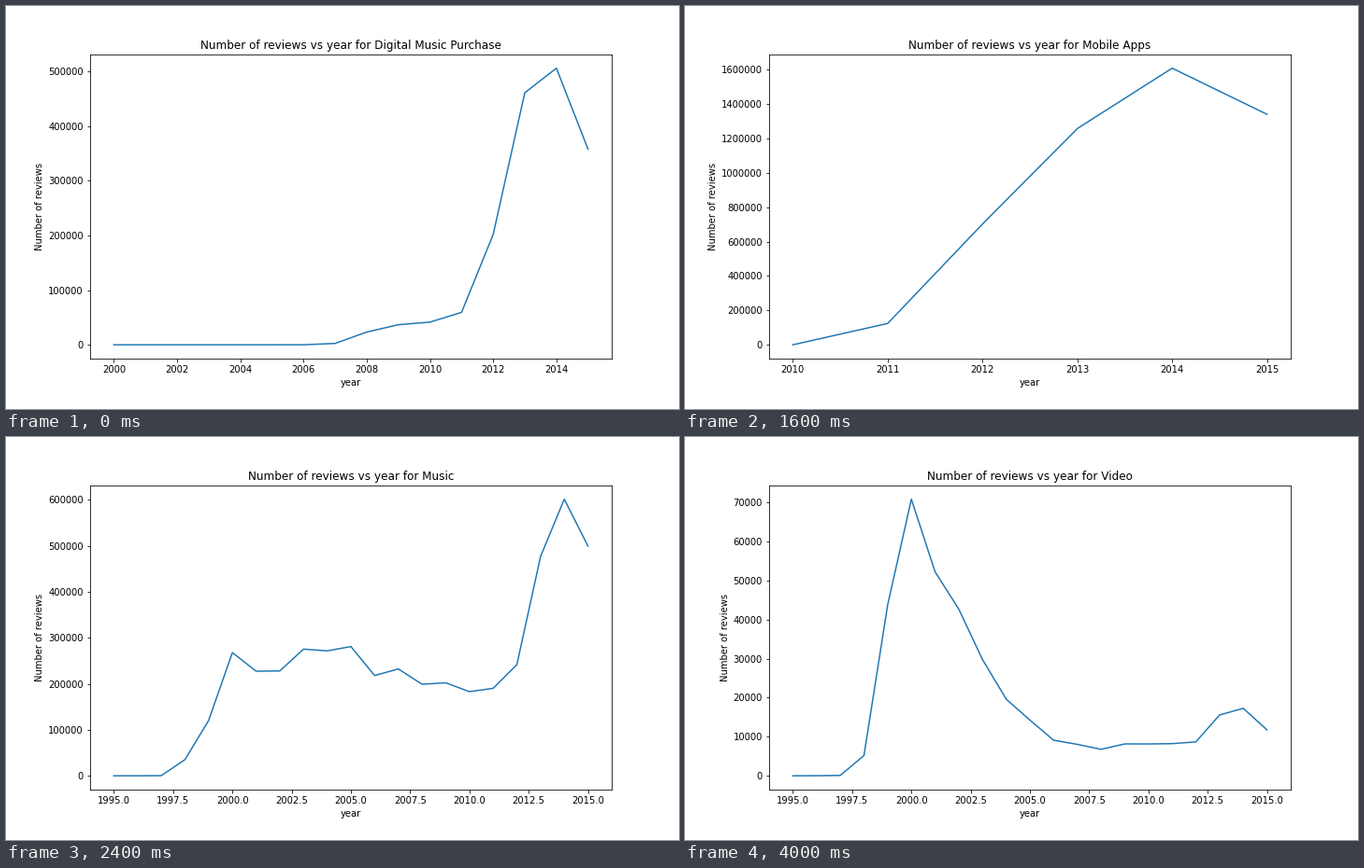
A matplotlib script for the animation above (4.8 s loop, 720 by 432 pixels).

```python
import matplotlib.pyplot as plt
from matplotlib.animation import FuncAnimation

LAST_YEAR = 2015
STEP_MS = 800

# Yearly review counts, each series ending in LAST_YEAR
SERIES = [
    ("Digital Music Purchase",
     [0, 0, 0, 0, 0, 0, 60, 2500, 23300, 36700, 41500, 59300,
      201700, 461000, 506000, 358000]),
    ("Digital Video Games",
     [0, 0, 10, 1570, 2560, 7630, 16640, 43310, 43800, 30000]),
    ("Mobile Apps",
     [0, 124000, 702000, 1257000, 1608000, 1340000]),
    ("Music",
     [0, 30, 300, 35200, 120500, 268000, 227500, 228000, 275400, 271700,
      281000, 218000, 232400, 199100, 202200, 183000, 190200, 241700,
      477000, 601500, 499500]),
    ("Software",
     [0, 190, 2540, 4320, 6410, 8080, 7475, 7690, 9300, 15915, 17480,
      22160, 22220, 23180, 28030, 56480, 64450, 45600]),
    ("Video",
     [0, 20, 100, 5180, 43780, 70870, 52260, 42700, 29790, 19640, 14260,
      9120, 8050, 6780, 8165, 8160, 8240, 8690, 15580, 17290, 11750]),
]

plt.rcParams.update({"font.family": "DejaVu Sans", "font.size": 10})
fig, ax = plt.subplots(figsize=(10, 6), dpi=72)
fig.subplots_adjust(left=0.125, right=0.9, bottom=0.125, top=0.88)


def draw(i):
    name, counts = SERIES[i]
    first = LAST_YEAR - len(counts) + 1
    ax.clear()
    ax.plot(range(first, LAST_YEAR + 1), counts, color="#1f77b4", lw=1.5)
    ax.ticklabel_format(style="plain", useOffset=False)
    ax.set_title(f"Number of reviews vs year for {name}")
    ax.set_xlabel("year")
    ax.set_ylabel("Number of reviews")
    return ax.get_children()


anim = FuncAnimation(fig, draw, frames=len(SERIES), interval=STEP_MS,
                     init_func=lambda: draw(0), repeat=True, repeat_delay=0)
plt.show()
```
